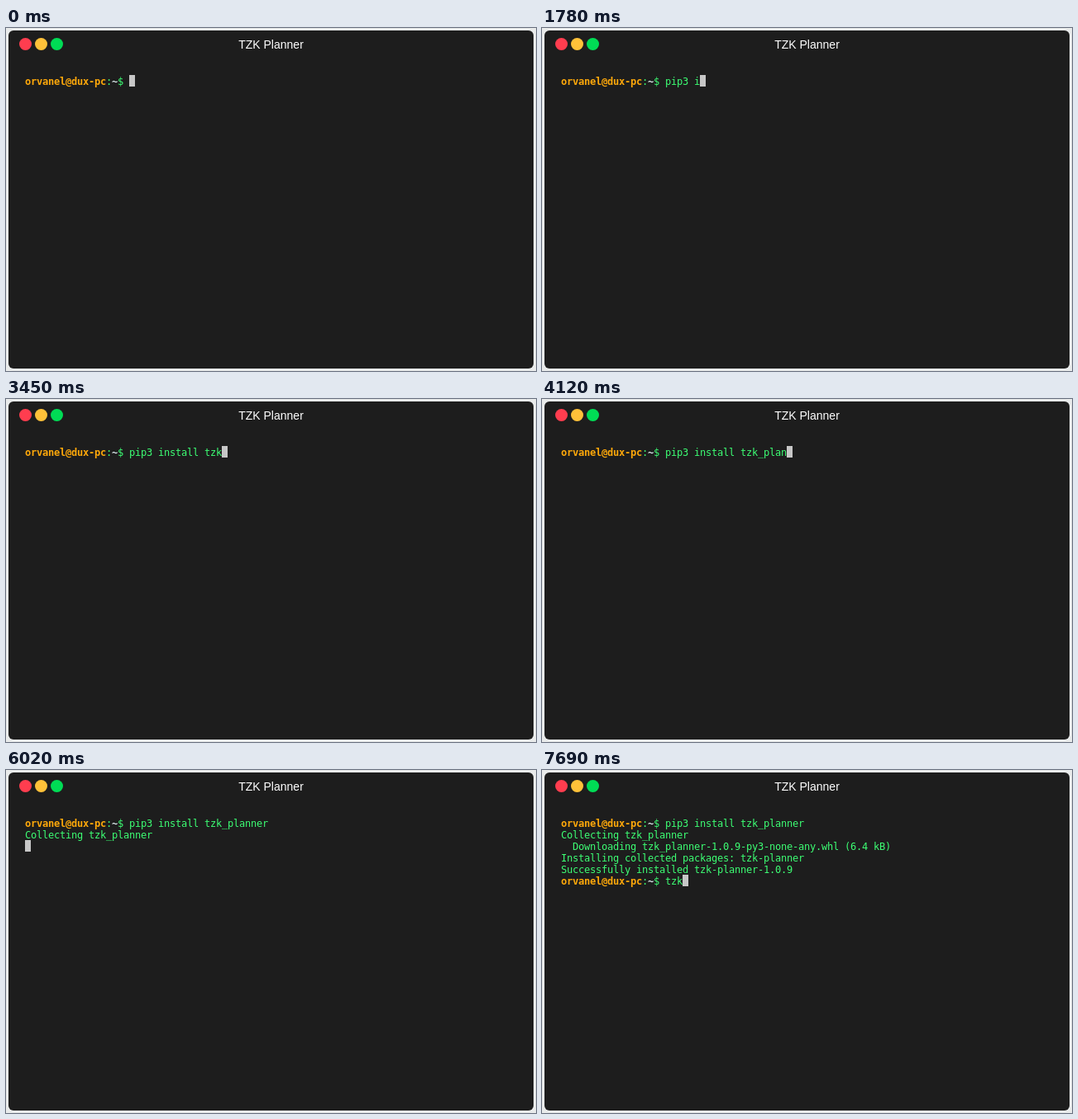
Write an HTML page that moves like this. It is 641x416 px and loops after 8 s.

```html
<!DOCTYPE html>
<html lang="en">
<head>
<meta charset="utf-8">
<title>Terminal</title>
<style>
  html, body { margin: 0; width: 100%; height: 100%; overflow: hidden; background: #e9ebeb; }
  #win { position: absolute; left: 3px; top: 3px; width: 635px; height: 410px; border-radius: 6px; background: #1d1d1d; }
  .dot { position: absolute; top: 9px; width: 15px; height: 15px; border-radius: 50%; }
  #title { position: absolute; left: 0; right: 0; top: 9px; text-align: center; color: #fff;
    font: 14px/16px "Liberation Sans", Arial, sans-serif; }
  #term { position: absolute; left: 20px; top: 55px; white-space: pre; color: #3dff74;
    font: 12px/14px "DejaVu Sans Mono", monospace; letter-spacing: calc(7px - 1ch); }
  #term b { color: #ffa90a; letter-spacing: calc(7px - 1ch); }
  #term b.dir { color: #d9e6ea; }
  #cursor { position: absolute; width: 7px; height: 14px; background: #c7c7c7; }
</style>
</head>
<body>
<div id="win">
  <div class="dot" style="left:13px;background:#ff3d4f"></div>
  <div class="dot" style="left:32px;background:#ffc139"></div>
  <div class="dot" style="left:51px;background:#00dc55"></div>
  <div id="title">TZK Planner</div>
  <div id="term"></div>
  <div id="cursor"></div>
</div>
<script>
const LOOP = 8000;
const USER = 'orvanel@dux-pc';
const PROMPT = USER + ':~$ ';
const STYLED = `<b>${USER}</b>:<b class="dir">~</b>$ `;

const typed = (text, times) => times.map((t, i) => [t, text[i]]);

// Each step appends its text to the screen at the given time.
const steps = [
  [0, PROMPT],
  ...typed('pip3 install tzk_planner', [
    750, 930, 1100, 1260, 1450, 1780, 1880, 2020, 2180, 2360, 2560, 2690,
    2850, 3140, 3260, 3450, 3590, 3720, 3890, 4010, 4120, 4290, 4440, 4620]),
  [5020, '\n'],
  [6020, 'Collecting tzk_planner\n'],
  [6130, '  Downloading tzk_planner-1.0.9-py3-none-any.whl (6.4 kB)\n'],
  [6330, 'Installing collected packages: tzk-planner\n'],
  [6430, 'Successfully installed tzk-planner-1.0.9\n'],
  [6530, PROMPT],
  ...typed('tzk', [7430, 7570, 7690])
];

const term = document.getElementById('term');
const cursor = document.getElementById('cursor');
let shown = -1;

function draw(t) {
  const count = steps.filter(s => s[0] <= t).length;
  if (count === shown) return;
  shown = count;
  const text = steps.slice(0, count).map(s => s[1]).join('');
  const lines = text.split('\n');
  term.innerHTML = text.replaceAll(PROMPT, () => STYLED);
  cursor.style.left = 20 + 7 * lines.at(-1).length + 'px';
  cursor.style.top = 54 + 14 * (lines.length - 1) + 'px';
}

const start = performance.now();
function tick() {
  draw((performance.now() - start) % LOOP);
  requestAnimationFrame(tick);
}
tick();
</script>
</body>
</html>
```
